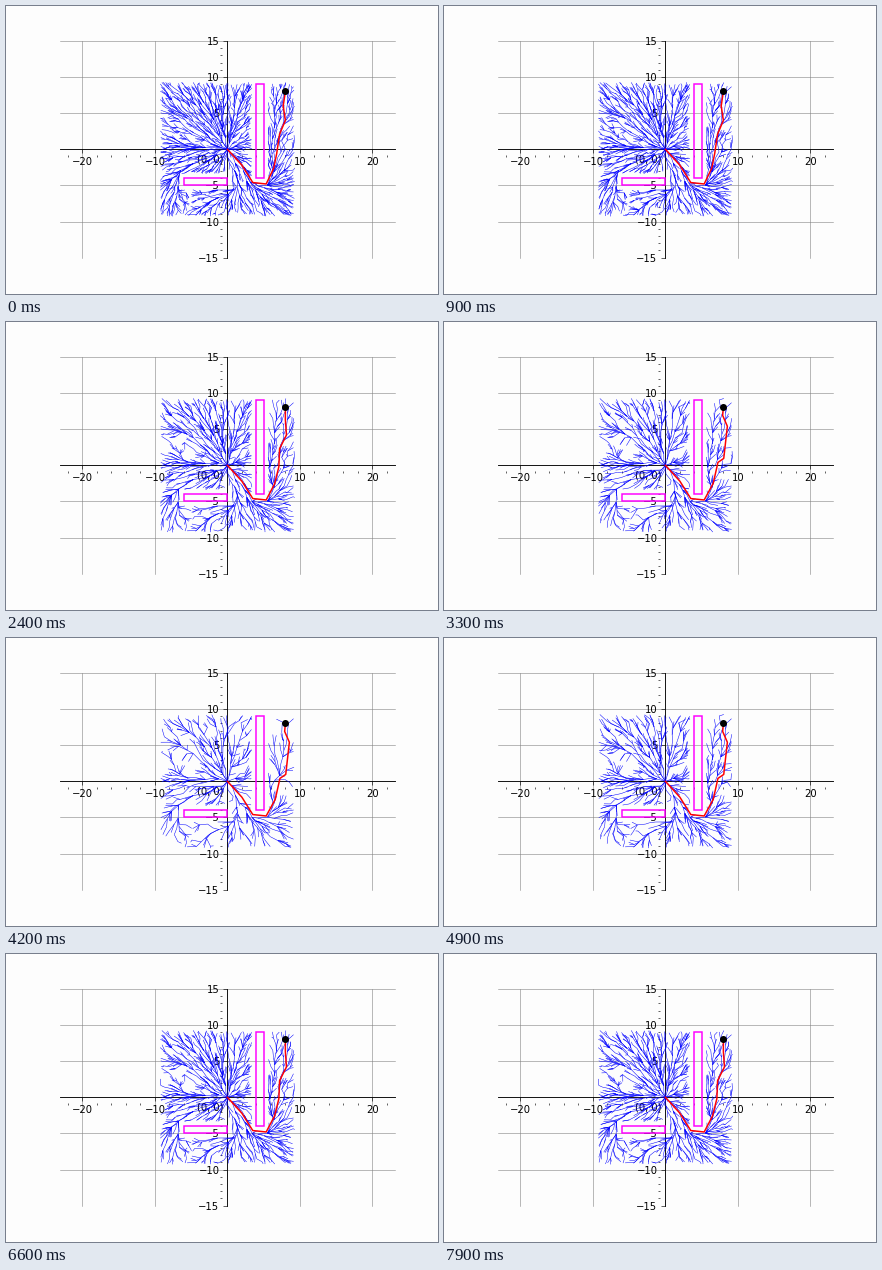
Write a matplotlib script that moves like this. It is 432 by 288 pixels and loops after 8 s.

```python
import numpy as np
import matplotlib
import matplotlib.pyplot as plt
from matplotlib.animation import FuncAnimation
from matplotlib.collections import LineCollection
from matplotlib.patches import Rectangle
from matplotlib.ticker import FixedLocator, FuncFormatter

matplotlib.rcParams["font.family"] = "DejaVu Sans"

W, H, DPI = 432, 288, 72
FRAMES, STEP_MS = 80, 100
STRIDE = 0.3105  # share of the growth skipped per frame
EXTENT, STEP, CLEARANCE = 9.3, 0.9, 0.6
BOXES = [(4, -4, 5, 9), (-6, -5, 0, -4)]
WALLS = [np.array([x0, y0, x1, y1]) + CLEARANCE * np.array([-1, -1, 1, 1])
         for x0, y0, x1, y1 in BOXES]

START = [(0, 0), (2, -2.2), (3.5, -4.6), (5.35, -4.8)]
ROUTES = [
    (0.75, [(6.4, -2.6), (6.8, -0.6), (7.2, 2.1), (8, 4), (7.7, 6), (8, 8)]),
    (0.25, [(6.5, -2.6), (7.1, -0.2), (7.2, 2.3), (8.15, 4.2), (8, 6.3), (8, 8)]),
    (0.0, [(6.6, -2.5), (7.25, 0.4), (8.05, 0.95), (8.55, 5.4), (7.9, 6.9), (8, 8)]),
]


def phase(i):
    return (i * STRIDE + 0.999) % 1


def node_count(i):
    return int(700 + 1600 * phase(i))


def clear(a, b):
    """True for every segment a[k]-b that misses all walls."""
    d = b - a
    d = np.where(np.abs(d) < 1e-9, 1e-9, d)
    ok = np.ones(len(a), bool)
    for wall in WALLS:
        t0, t1 = (wall[:2] - a) / d, (wall[2:] - a) / d
        enter = np.minimum(t0, t1).max(axis=1)
        leave = np.maximum(t0, t1).min(axis=1)
        ok &= (enter > leave) | (leave < 0) | (enter > 1)
    return ok


def grow(counts):
    """RRT* from the origin; returns the tree's segments at each node count."""
    rng = np.random.default_rng(7)
    total = max(counts)
    pts = np.zeros((total, 2))
    cost = np.zeros(total)
    parent = np.zeros(total, int)
    kids = [set() for _ in range(total)]
    trees, n = {}, 1
    while n < total:
        p = rng.uniform(-EXTENT, EXTENT, 2)
        dist = np.hypot(*(pts[:n] - p).T)
        k = dist.argmin()
        if dist[k] > STEP:
            p = pts[k] + (p - pts[k]) * STEP / dist[k]
            dist = np.hypot(*(pts[:n] - p).T)
        radius = min(1.4, 13.5 * np.sqrt(np.log(n + 1) / n))
        near = np.flatnonzero(dist < radius)
        near = near[clear(pts[near], p)]
        if not len(near):
            continue
        via = cost[near] + dist[near]
        best = near[via.argmin()]
        pts[n], cost[n], parent[n] = p, via.min(), best
        kids[best].add(n)
        for j in near[cost[n] + dist[near] < cost[near] - 1e-9]:
            gain = cost[j] - cost[n] - dist[j]
            kids[parent[j]].discard(j)
            parent[j] = n
            kids[n].add(j)
            stack = [j]
            while stack:
                q = stack.pop()
                cost[q] -= gain
                stack.extend(kids[q])
        n += 1
        if n in counts:
            trees[n] = np.stack([pts[1:n], pts[parent[1:n]]], axis=1)
    return trees


trees = grow({node_count(i) for i in range(FRAMES)})

fig = plt.figure(figsize=(W / DPI, H / DPI), dpi=DPI, facecolor="#fdfdfd")
ax = fig.add_axes([54 / W, 36.3 / H, 334.8 / W, 216.8 / H], facecolor="none")
ax.set(xlim=(-23.1, 23.1), ylim=(-15, 15))
ax.set_axisbelow(True)

for side in ("top", "right"):
    ax.spines[side].set_visible(False)
for side in ("left", "bottom"):
    ax.spines[side].set(position=("data", 0), linewidth=0.9, zorder=2)

X_MAJOR = (-20, -10, 10, 20)
Y_MAJOR = (-15, -10, -5, 5, 10, 15)
label = FuncFormatter(lambda v, _: f"{v:.0f}".replace("-", "\u2212"))
for axis, major in ((ax.xaxis, X_MAJOR), (ax.yaxis, Y_MAJOR)):
    axis.set_major_locator(FixedLocator(major))
    axis.set_major_formatter(label)
ax.tick_params(length=4, width=0.6, pad=4, labelsize=10)

# Minor ticks float a little way off the axes.
minor = dict(ls="", color="black", ms=2.5, mew=0.6, zorder=2)
xs = [x for x in range(-22, 23, 2) if x % 10]
ys = [y for y in range(-14, 15) if y % 5]
ax.plot(xs, [-0.9] * len(xs), marker="|", **minor)
ax.plot([-0.9] * len(ys), ys, marker="_", **minor)

grid = dict(color="gray", lw=0.55, zorder=0.5, clip_on=False)
for x in X_MAJOR:
    ax.plot([x, x], [-15, 15], **grid)
for y in Y_MAJOR[1:]:
    ax.plot([-23.1, 23.1], [y, y], **grid)

ax.annotate("(0, 0)", (0, 0), xytext=(-4, -5), textcoords="offset points",
            ha="right", va="top", fontsize=10, zorder=2.5)

tree = LineCollection([], colors="blue", linewidths=0.5, zorder=3)
ax.add_collection(tree)
for x0, y0, x1, y1 in BOXES:
    ax.add_patch(Rectangle((x0, y0), x1 - x0, y1 - y0, fill=False,
                           ec="magenta", lw=1.5, zorder=4))
route, = ax.plot([], [], color="red", lw=1.5, zorder=5)
ax.plot([8], [8], "o", color="black", ms=7, mew=0, zorder=6)


def draw(i):
    tree.set_segments(trees[node_count(i)])
    rest = next(r for low, r in ROUTES if phase(i) >= low)
    route.set_data(*zip(*(START + rest)))
    return tree, route


anim = FuncAnimation(fig, draw, frames=FRAMES, interval=STEP_MS,
                     repeat=True, repeat_delay=0, blit=False)
plt.show()
```
